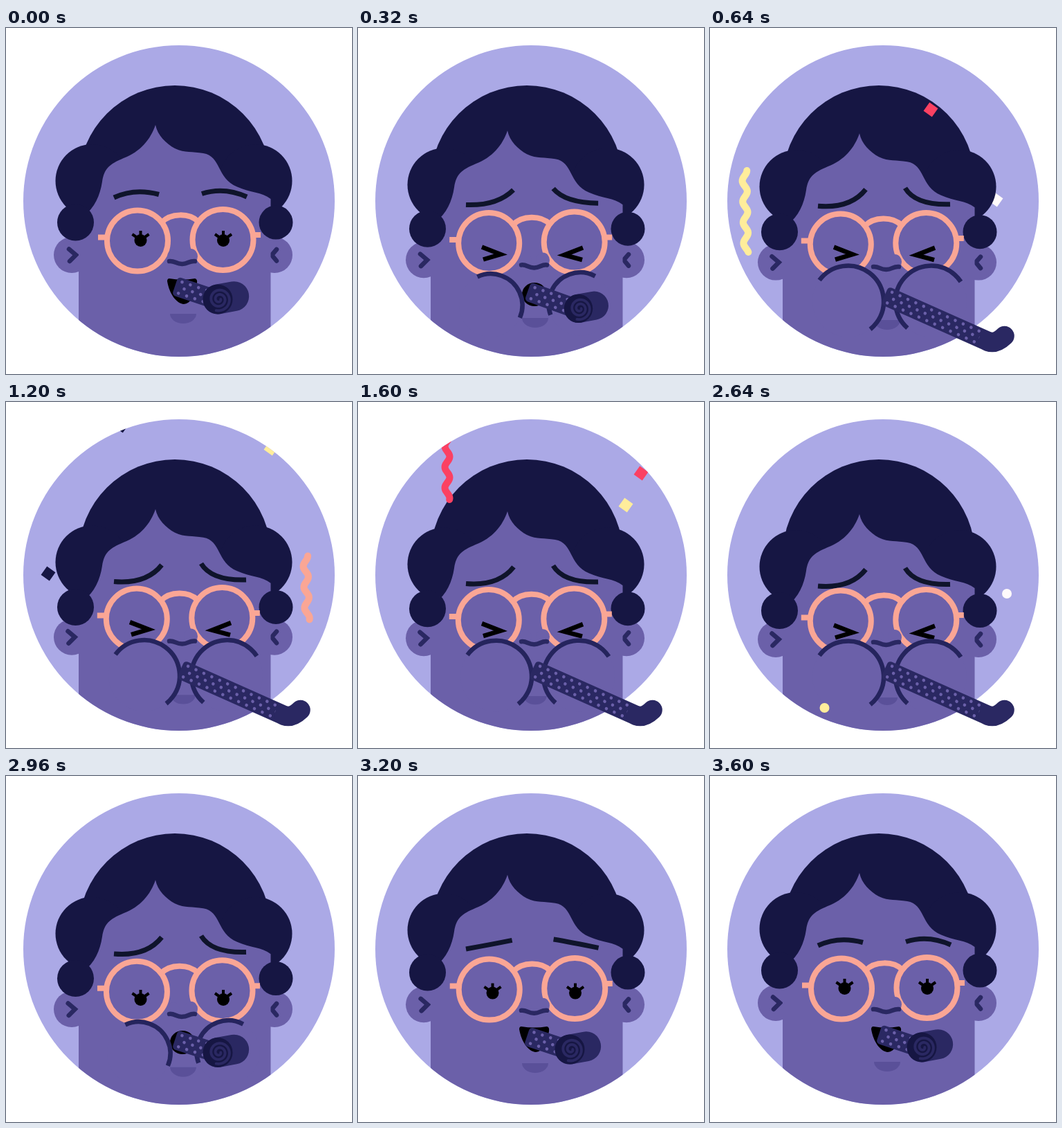
Animation, 500 px wide and 500 px high, one loop 3.68 s. Source, as an HTML page with a canvas:

```html
<!DOCTYPE html>
<html lang="en">
<head>
<meta charset="utf-8">
<title>Party horn</title>
<style>
html, body { margin: 0; width: 100%; height: 100%; overflow: hidden; background: #fff; }
canvas { display: block; width: 100vw; height: 100vh; }
</style>
</head>
<body>
<canvas id="stage" width="500" height="500"></canvas>
<script>
const ctx = document.getElementById('stage').getContext('2d');
const LOOP = 3680, STEP = 80, FALL = 0.68;
const SKIN = '#6b60a9', HAIR = '#161643', LINE = '#2a2862', PINK = '#faa695',
      BROW = '#0f142b', YELLOW = '#ffed9b', RED = '#fb4162', WHITE = '#fffafb';

// Each piece passes (x, y) at the given time and falls at a constant speed.
const confetti = [
  { kind: 'wave', x: 51, y: 265, at: 640, color: YELLOW, len: 118, tilt: -0.02 },
  { kind: 'square', x: 319, y: 118, at: 640, color: RED, tilt: 0.62 },
  { kind: 'square', x: 413, y: 248, at: 640, color: WHITE, tilt: 0.62, back: true },
  { kind: 'square', x: 61, y: 248, at: 1200, color: HAIR, tilt: 0.62 },
  { kind: 'wave', x: 434, y: 269, at: 1200, color: PINK, len: 93, tilt: -0.03 },
  { kind: 'square', x: 167, y: 34, at: 1200, color: HAIR, tilt: 0.62, back: true },
  { kind: 'square', x: 383, y: 67, at: 1200, color: YELLOW, tilt: 0.62, back: true },
  { kind: 'square', x: 220, y: 77, at: 2000, color: PINK, tilt: 0.62, back: true },
  { kind: 'dot', x: 339.5, y: 158, at: 2000, color: '#c6c5fb' },
  { kind: 'square', x: 89, y: 243, at: 2000, color: '#8987de', tilt: 0 },
  { kind: 'dot', x: 69, y: 364, at: 2000, color: WHITE },
  { kind: 'square', x: 409, y: 375, at: 2000, color: RED, tilt: 0.62 },
  { kind: 'wave', x: 129, y: 367, at: 2000, color: RED, len: 92, tilt: 0 },
  { kind: 'square', x: 387, y: 421, at: 2000, color: YELLOW, tilt: 0.62, back: true },
  { kind: 'dot', x: 429, y: 277, at: 2640, color: WHITE },
  { kind: 'dot', x: 165.5, y: 442, at: 2640, color: YELLOW }
];

const mix = (a, b, k) => a + (b - a) * k;
const mixAll = (a, b, k) => a.map((v, i) => mix(v, b[i], k));
const clamp = v => Math.max(0, Math.min(1, v));
const ramp = (t, from, to) => clamp((t - from) / (to - from));
const ease = k => k < 0.5 ? 2 * k * k : 1 - 2 * (1 - k) * (1 - k);
const pulse = (t, a, b, c, d) => ease(ramp(t, a, b)) * (1 - ease(ramp(t, c, d)));
const rad = deg => deg * Math.PI / 180;

function disc(x, y, r, color, ry = r) {
  ctx.fillStyle = color;
  ctx.beginPath();
  ctx.ellipse(x, y, r, ry, 0, 0, 2 * Math.PI);
  ctx.fill();
}

function stroke(color, width, cap = 'butt', join = 'miter') {
  ctx.strokeStyle = color;
  ctx.lineWidth = width;
  ctx.lineCap = cap;
  ctx.lineJoin = join;
  ctx.stroke();
}

function line(points, color, width, cap, join) {
  ctx.beginPath();
  for (let i = 0; i < points.length; i += 2) ctx.lineTo(points[i], points[i + 1]);
  stroke(color, width, cap, join);
}

function curve([x1, y1, cx, cy, x2, y2], color, width, cap) {
  ctx.beginPath();
  ctx.moveTo(x1, y1);
  ctx.quadraticCurveTo(cx, cy, x2, y2);
  stroke(color, width, cap);
}

function drawConfetti(t, back) {
  for (const p of confetti) {
    if (!!p.back !== back) continue;
    const y = p.y + (t - p.at) * FALL;
    if (y < -80 || y > 580) continue;
    ctx.save();
    ctx.translate(p.x, y);
    ctx.rotate(p.tilt || 0);
    if (p.kind === 'dot') disc(0, 0, 7, p.color);
    else if (p.kind === 'square') {
      ctx.fillStyle = p.color;
      ctx.fillRect(-7.5, -7.5, 15, 15);
    } else {
      ctx.beginPath();
      for (let v = 0; v <= p.len; v += 2) {
        ctx.lineTo(3.5 * Math.cos(v * 2 * Math.PI / 30), v - p.len / 2);
      }
      stroke(p.color, 10, 'round', 'round');
    }
    ctx.restore();
  }
}

function drawHead(q, s) {
  const earY = 328 + 10.5 * q + 4.5 * s;
  const markX = 91 - 1.5 * q;
  disc(95, earY, 26, SKIN);
  disc(388, earY, 26, SKIN);
  line([markX, earY - 8.5, markX + 10, earY, markX + 1, earY + 9], LINE, 6.5, 'round');
  line([391, earY - 8, 384, earY, 391, earY + 8.5], LINE, 6.5, 'round');

  const bunY = 221 + 8 * q + 9 * s;
  disc(244, 222, 139, HAIR);
  disc(124.5, bunY, 53, HAIR);
  disc(360.5, bunY, 53, HAIR);

  const d = 12 * q + 10 * s;
  ctx.fillStyle = SKIN;
  ctx.beginPath();
  ctx.moveTo(216, 140 + d);
  ctx.bezierCurveTo(209, 161 + d, 194, 179 + d, 170, 188 + d);
  ctx.bezierCurveTo(149, 197 + d, 142, 203 + d, 139, 222 + d);
  ctx.bezierCurveTo(136, 242 + d, 128, 260 + d, 112, 272 + d);
  ctx.lineTo(105, 290 + d);
  ctx.lineTo(105, 490);
  ctx.lineTo(382.5, 490);
  ctx.lineTo(382.5, 247 + d);
  ctx.bezierCurveTo(370, 237 + d, 353, 238 + d, 334, 229.5 + d);
  ctx.bezierCurveTo(304, 217 + d, 311, 185 + d, 285, 181 + d);
  ctx.bezierCurveTo(269, 178 + d, 259, 181 + d, 244, 174 + d);
  ctx.bezierCurveTo(231, 167 + d, 219, 155 + d, 216, 140 + d);
  ctx.fill();

  const lowY = 281 + 13.5 * q + 7 * s;
  disc(100.5, lowY, 26.5, HAIR);
  disc(390, lowY, 24.5, HAIR);
}

function drawGlasses(q, s) {
  const y = 5 * q + 4 * s;
  const ring = (x, cy) => {
    ctx.beginPath();
    ctx.arc(x, cy, 44, 0, 2 * Math.PI);
    stroke(PINK, 8);
  };
  ctx.save();
  ctx.translate(-1.2 * q, y);
  ring(190, 307.5);
  ring(313.5, 306);
  ctx.beginPath();
  ctx.moveTo(225, 281);
  ctx.bezierCurveTo(238, 267, 265, 267, 278, 280);
  stroke(PINK, 8);
  line([133, 302.5, 144, 302.5], PINK, 8);
  line([358, 299, 368, 299], PINK, 8);
  ctx.restore();
}

function drawEyes(b, s, squint) {
  if (squint) {
    const y = 6 * s;
    line([179, 316.5 + y, 206, 327 + y, 181, 334.5 + y], '#000', 6.5);
    line([325, 317.5 + y, 298, 328 + y, 324, 335 + y], '#000', 6.5);
    return;
  }
  const y = 307 + 16 * b;
  for (const x of [194.5, 314]) {
    disc(x, y, 9, '#000');
    line([x, y - 6, x, y - 14], '#000', 4);
    line([x - 5, y - 4, x - 12, y - 9], '#000', 4);
    line([x + 5, y - 4, x + 12, y - 9], '#000', 4);
  }
}

function drawBrows(b, s) {
  ctx.save();
  ctx.translate(0, 9 * s);
  curve(mixAll([156, 245, 186, 231, 221, 240.5], [156, 257, 203, 261, 225, 233], b), BROW, 7);
  curve(mixAll([283, 239.5, 315, 229, 348, 244], [282, 231, 297, 256, 347, 254.5], b), BROW, 7);
  ctx.restore();
}

function drawNose(q, s) {
  const y = 338 + 8 * q + 2 * s;
  disc(242, y - 8, 9, SKIN, 10);
  disc(267, y - 8, 10, SKIN, 11);
  ctx.beginPath();
  ctx.moveTo(236, y - 1);
  ctx.bezierCurveTo(244, y - 2, 246, y + 3.5, 255, y + 3);
  ctx.bezierCurveTo(263, y + 3, 265, y - 2, 273, y - 1);
  stroke(LINE, 6.5, 'round');
}

function drawMouth(q, s, b, puff) {
  const chinY = 413 + 9 * q + 5 * s;
  ctx.fillStyle = '#5a5099';
  ctx.beginPath();
  ctx.ellipse(256, chinY, 19 - 4 * s, 14 - 3 * s, 0, 0, Math.PI);
  ctx.fill();
  if (puff > 0.9) return;
  if (b > 0.5) {
    disc(255, 385, 18, '#000', 17);
    return;
  }
  ctx.fillStyle = '#000';
  ctx.beginPath();
  ctx.moveTo(236, 362);
  ctx.quadraticCurveTo(255, 365, 273, 362);
  ctx.quadraticCurveTo(277, 363, 276, 369);
  ctx.bezierCurveTo(273, 387, 267, 398, 257, 399);
  ctx.bezierCurveTo(246, 398, 236, 384, 233, 366);
  ctx.quadraticCurveTo(233, 362, 236, 362);
  ctx.fill();
}

function drawCheeks(k, s) {
  if (k < 0.03) return;
  const half = 97.5 * Math.sqrt(k), r = mix(40, 51.5, k);
  const cheek = (x, y, mid) => {
    disc(x, y, r, SKIN);
    ctx.beginPath();
    ctx.arc(x, y, r, rad(mid - half), rad(mid + half));
    stroke('#25245d', 6.5);
  };
  cheek(mix(184, 199.5, k), mix(407, 395, k) + 2 * s, -46);
  cheek(mix(323, 319.5, k), mix(403, 395, k) + 2 * s, -131);
}

function drawBand(x1, y1, x2, y2, width) {
  const length = Math.hypot(x2 - x1, y2 - y1);
  ctx.save();
  ctx.translate(x1, y1);
  ctx.rotate(Math.atan2(y2 - y1, x2 - x1));
  ctx.fillStyle = LINE;
  ctx.beginPath();
  ctx.roundRect(-4, -width / 2, length + 5, width, 5);
  ctx.fill();
  for (let row = -1; row <= 1; row++) {
    for (let x = row ? 4 : 10; x < length - 1; x += 12.5) {
      disc(x, row * 8.5, 2.3, SKIN);
    }
  }
  ctx.restore();
}

function drawRoll(x, y, r) {
  ctx.beginPath();
  ctx.moveTo(x, y);
  ctx.lineTo(x + 1.1 * r, y - 0.2 * r);
  stroke(LINE, 2 * r, 'round');
  disc(x, y, r, HAIR);
  ctx.beginPath();
  for (let a = 0; a < 4.6 * Math.PI; a += 0.15) {
    const reach = r * (0.1 + a * 0.047);
    ctx.lineTo(x + 2 + reach * Math.cos(a), y + reach * Math.sin(a));
  }
  stroke(LINE, r * 0.18, 'round', 'round');
}

function drawHorn(p, b) {
  const [x1, y1] = mixAll([248, 374 + 8 * b], [256, 388], p);
  const [x2, y2] = mixAll([302, 392 + 7.5 * b], [402, 453], p);
  drawBand(x1, y1, x2, y2, 28);
  if (p > 0.98) {
    curve([402, 453, 413, 457, 425.5, 445], LINE, 28.5, 'round');
  } else {
    drawRoll(x2 + 4, y2, mix(21.5, 15, p));
  }
}

function draw(t) {
  const sag = pulse(t, 80, 480, 2800, 3400);
  const drift = pulse(t, 400, 2560, 2720, 2960);
  const mood = pulse(t, 80, 400, 2960, 3400);
  const puff = pulse(t, 160, 480, 2800, 3120);
  const blow = pulse(t, 240, 560, 2720, 2880);
  const squint = t >= 320 && t < 2880;

  ctx.fillStyle = '#fff';
  ctx.fillRect(0, 0, 500, 500);
  ctx.save();
  ctx.beginPath();
  ctx.arc(250, 250, 225, 0, 2 * Math.PI);
  ctx.clip();
  ctx.fillStyle = '#aba9e6';
  ctx.fillRect(0, 0, 500, 500);
  drawConfetti(t, true);
  drawHead(sag, drift);
  drawBrows(mood, drift);
  drawGlasses(sag, drift);
  drawEyes(mood, drift, squint);
  drawMouth(sag, drift, mood, puff);
  drawCheeks(puff, drift);
  drawNose(sag, drift);
  drawConfetti(t, false);
  ctx.restore();
  drawHorn(blow, mood);
}

const start = performance.now();
function tick() {
  const t = (performance.now() - start) % LOOP;
  draw(Math.floor(t / STEP) * STEP);
  requestAnimationFrame(tick);
}
tick();
</script>
</body>
</html>
```
